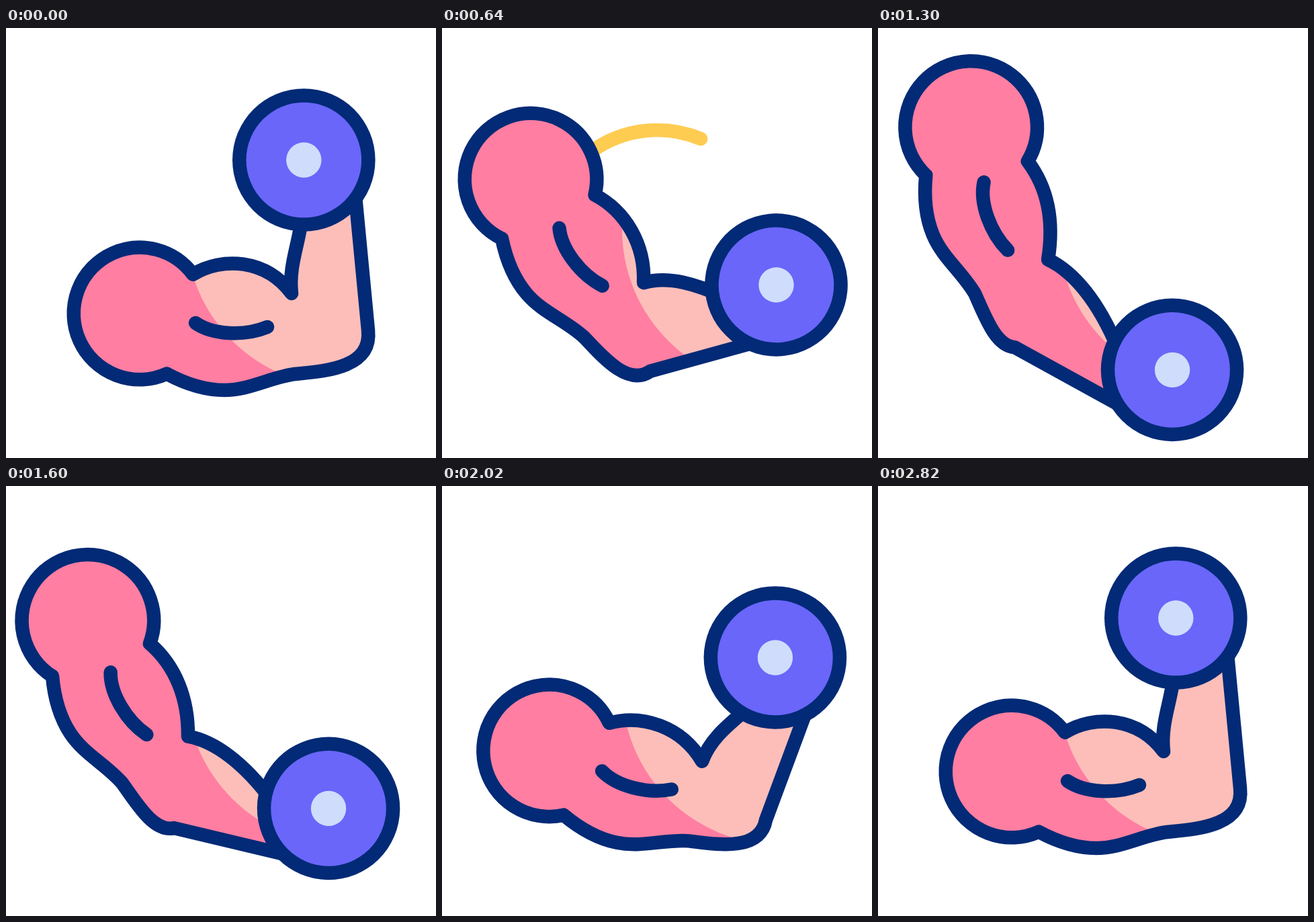
An HTML page with a canvas for the animation above (3.6 s loop, 640 by 640 pixels).

```html
<!DOCTYPE html>
<html lang="en">
<head>
<meta charset="utf-8">
<title>Biceps curl</title>
<style>
  html, body { margin: 0; width: 100%; height: 100%; overflow: hidden; background: #fff; }
  canvas { display: block; width: 640px; height: 640px; }
</style>
</head>
<body>
<canvas id="stage" width="640" height="640"></canvas>
<script>
const ctx = document.getElementById('stage').getContext('2d');
const LOOP = 3600, STEP = 20, RAD = Math.PI / 180;
const NAVY = '#032a76', PINK = '#ff7ea1', PEACH = '#fdbeb9';
const PURPLE = '#6966f9', PALE = '#d0dcfc', YELLOW = '#ffcc52';
const PIVOT = [333, 215];

// Ease from 0 to 1, the same as cubic-bezier(x1, 0, x2, 1).
function ease(start, duration, x1, x2) {
  return t => {
    const x = Math.min(1, Math.max(0, (t - start) / duration));
    let lo = 0, hi = 1;
    for (let i = 0; i < 24; i++) {
      const u = (lo + hi) / 2, w = 1 - u;
      if (3 * u * w * w * x1 + 3 * u * u * w * x2 + u * u * u < x) lo = u; else hi = u;
    }
    return lo * lo * (3 - 2 * lo);
  };
}

// Goes out to a value with one ease and comes back with another.
const outAndBack = (size, out, back) => t => size * (out(t) - back(t));

const turn = outAndBack(67.8, ease(0, 1140, 0.48, 0.36), ease(1200, 1620, 0.52, 0.06));   // degrees
const drift = outAndBack(51, ease(100, 800, 0.4, 0.3), ease(1300, 600, 0.78, 0.53));      // pixels
const unfold = outAndBack(1, ease(155, 1056, 0.55, 0.3), ease(1200, 1560, 0.62, 0.23));

// Both ends of the swoosh follow the same sweep, one behind the other.
const sweep = (start, duration) => {
  const e = ease(start, duration, 1 / 3, 2 / 3);
  return t => (-150 + 210 * e(t)) * RAD;
};
const head = sweep(136, 1175), tail = sweep(406, 1096);

// Outline of the arm, from bent (k = 0) to unfolded (k = 1).
function armPath(k) {
  const mix = (x0, y0, x1, y1) => [x0 + (x1 - x0) * k, y0 + (y1 - y0) * k];
  const p = new Path2D();
  p.moveTo(...mix(518, 230, 688, 363));
  p.lineTo(...mix(539, 450, 526.5, 491));
  p.bezierCurveTo(...mix(545, 508, 514, 516), ...mix(470, 511, 470, 514), 430, 515);
  p.bezierCurveTo(393, 520, 362, 539, 325, 539);
  p.bezierCurveTo(295, 539, 266, 529, 239, 514.5);
  p.arc(199, 425, 98.3, 65.8 * RAD, 323.7 * RAD);
  p.bezierCurveTo(...mix(322, 340, 328, 354), ...mix(387, 344, 378, 366), 425, 395);
  p.bezierCurveTo(...mix(420, 352, 457, 366), ...mix(438, 318, 513, 350), ...mix(441, 275, 587, 350));
  return p;
}

function disc(x, y, r, color) {
  ctx.beginPath();
  ctx.arc(x, y, r, 0, 2 * Math.PI);
  ctx.fillStyle = color;
  ctx.fill();
}

function pose(t) {
  const d = drift(t);
  ctx.translate(PIVOT[0] + d, PIVOT[1] - d * 0.476);
  ctx.rotate(turn(t) * RAD);
  ctx.translate(-PIVOT[0], -PIVOT[1]);
}

function drawSwoosh(t) {
  const a = tail(t), b = head(t);
  if (b - a < 0.002) return;
  ctx.beginPath();
  ctx.arc(320.5, 319.3, 167.3, a, b);
  ctx.strokeStyle = YELLOW;
  ctx.stroke();
}

function draw(t) {
  const k = unfold(t), arm = armPath(k);
  ctx.fillStyle = '#fff';
  ctx.fillRect(0, 0, 640, 640);
  ctx.lineWidth = 20.5;
  ctx.lineCap = ctx.lineJoin = 'round';
  drawSwoosh(t);

  // The light area stays put on the stage while the arm moves over it.
  ctx.save();
  pose(t);
  ctx.clip(arm);
  ctx.resetTransform();
  ctx.fillStyle = PINK;
  ctx.fillRect(0, 0, 640, 640);
  disc(501.7, 300, 233.7, PEACH);
  ctx.restore();

  ctx.save();
  pose(t);
  ctx.strokeStyle = NAVY;
  ctx.stroke(arm);
  ctx.beginPath();
  ctx.moveTo(282, 439);
  ctx.bezierCurveTo(308, 457, 355, 459, 389, 445);
  ctx.stroke();
  const x = 443.3 + 205 * k, y = 196.5 + 91 * k;
  disc(x, y, 106.3, NAVY);
  disc(x, y, 85.8, PURPLE);
  disc(x, y, 26.2, PALE);
  ctx.restore();
}

const start = performance.now();
function frame() {
  const t = (performance.now() - start) % LOOP;
  draw(Math.floor(t / STEP) * STEP);
  requestAnimationFrame(frame);
}
frame();
</script>
</body>
</html>
```
